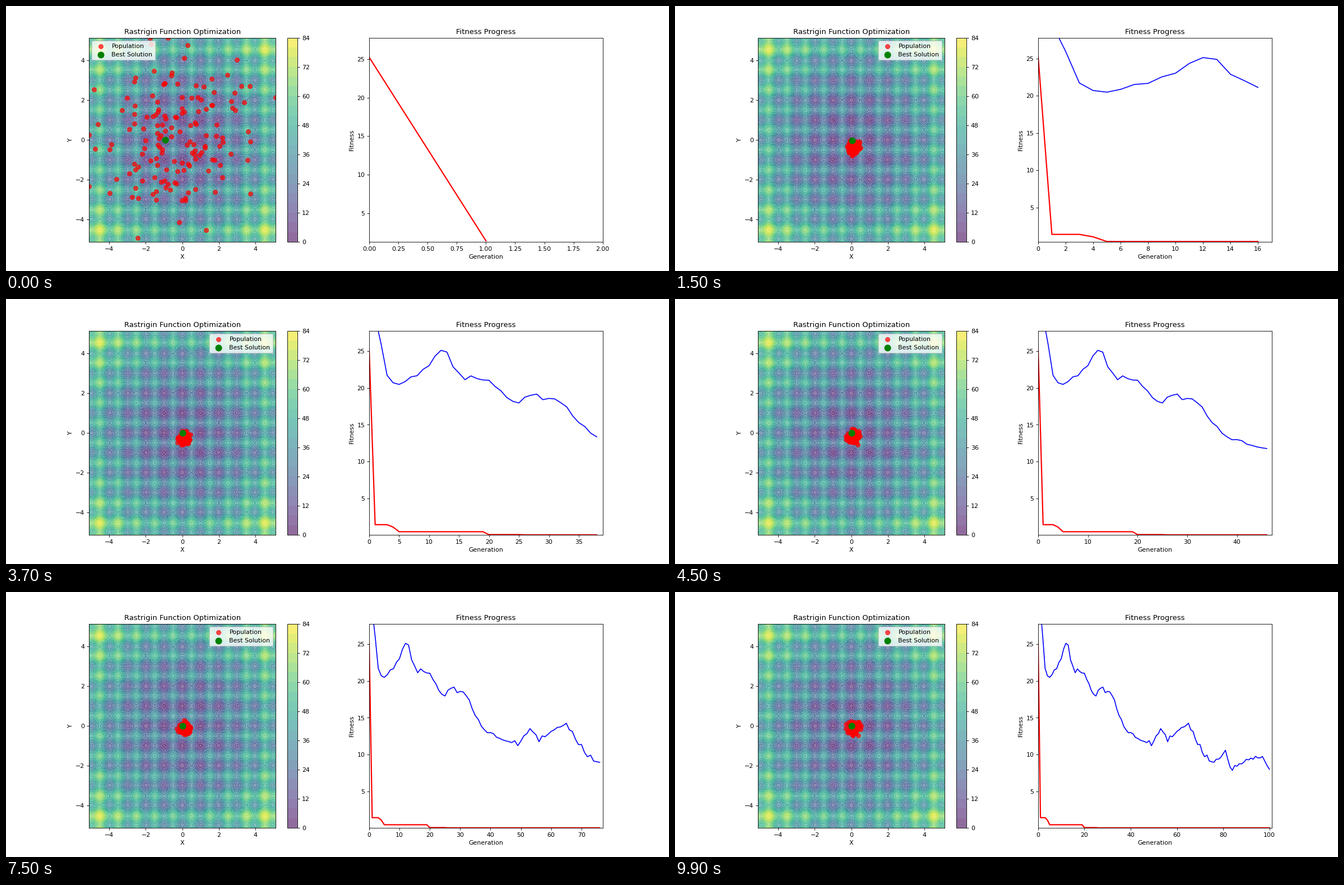
These frames come from a looping animation (1183x473 px, 10 s). A matplotlib script:

```python
import numpy as np
import matplotlib.pyplot as plt
from matplotlib.animation import FuncAnimation

FRAMES, INTERVAL = 100, 100
WIDTH, HEIGHT = 1183.01, 473.01   # slightly over, so rounding down is safe
DPI = WIDTH / 15
LIMIT = 5.12
POP_SIZE = 150

# Best solution: generation at which it is found, x, y
BEST = [(0, -.95, 2.627), (1, -.95, 0), (4, .052, -.052),
        (5, .033, -.033), (20, .01, -.01), (26, .004, -.004)]

# Turning points of the mean fitness: generation, value
MEAN_KEYS = [(0, 36), (1, 29.7), (3, 21.6), (5, 20.5), (10, 23), (12.5, 25.6),
             (15, 21.6), (20, 21.2), (24, 17.9), (27, 19.2), (32, 18.3),
             (35, 15.1), (39, 13), (49, 11.3), (53, 13.6), (56, 12),
             (65, 14.2), (71, 10.3), (75, 8.8), (81, 10.6), (83, 7.8),
             (90, 9.5), (97, 9.5), (100, 8)]


def rastrigin(x, y):
    return 20 + sum(v**2 - 10 * np.cos(2 * np.pi * v) for v in (x, y))


def best_at(generation):
    return [(x, y) for start, x, y in BEST if start <= generation][-1]


def population(frame):
    """A cloud that contracts quickly, then drifts slowly to the optimum."""
    rng = np.random.default_rng(frame)
    spread = .15 + 1.9 * np.exp(-.7 * frame)
    settle = 1 - np.exp(-frame / 4)
    centre = settle * np.array([.12, -.55 * np.exp(-frame / 50)])
    noise = np.clip(rng.normal(size=(POP_SIZE, 2)), -2.7, 2.7)
    return np.clip(centre + spread * noise, -LIMIT, LIMIT)


generations = np.arange(FRAMES + 1)
best_fit = np.array([rastrigin(*best_at(g)) for g in generations])
mean_fit = np.interp(generations, *zip(*MEAN_KEYS))
mean_fit += np.random.default_rng(4).normal(0, .2, len(generations))

fig, (ax_map, ax_fit) = plt.subplots(
    1, 2, figsize=(WIDTH / DPI, HEIGHT / DPI), dpi=DPI)

axis = np.linspace(-LIMIT, LIMIT, 100)
gx, gy = np.meshgrid(axis, axis)
contour = ax_map.contourf(gx, gy, rastrigin(gx, gy), levels=20,
                          cmap="viridis", alpha=.6)
fig.colorbar(contour, ax=ax_map)
dots = ax_map.scatter([], [], c="red", s=50, alpha=.7, label="Population")
best_dot = ax_map.scatter([], [], c="green", s=100, label="Best Solution")
legend = ax_map.legend(loc="upper right")
ax_map.set(xlim=(-LIMIT, LIMIT), ylim=(-LIMIT, LIMIT), xlabel="X", ylabel="Y",
           title="Rastrigin Function Optimization")

best_line, = ax_fit.plot([], [], "r-", lw=2)
mean_line, = ax_fit.plot([], [], "b-", lw=1.5)
ax_fit.set(xlabel="Generation", ylabel="Fitness", title="Fitness Progress")


def update(frame):
    dots.set_offsets(population(frame))
    best_dot.set_offsets([best_at(frame + 1)])
    legend.set_loc("upper left" if frame == 0 else "upper right")

    count = frame + 2
    best_line.set_data(generations[:count], best_fit[:count])
    mean_line.set_data(generations[:count], mean_fit[:count])
    ax_fit.set_xlim(0, count)
    ax_fit.set_ylim(best_fit[count - 1] * .9, best_fit[0] * 1.1)
    return dots, best_dot, legend, best_line, mean_line


anim = FuncAnimation(fig, update, frames=FRAMES, interval=INTERVAL,
                     init_func=lambda: update(0), repeat=True, repeat_delay=0)
plt.show()
```
